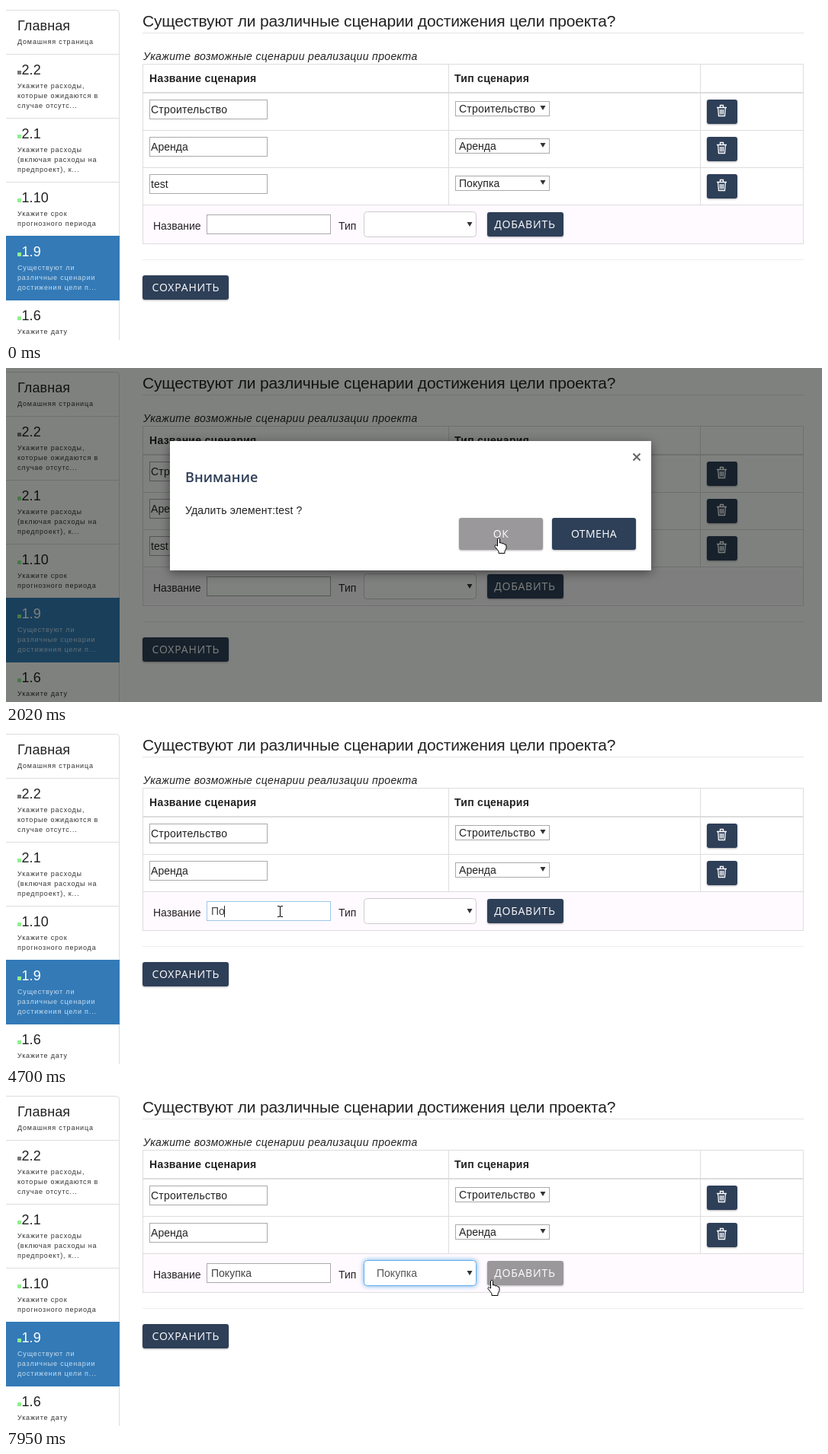
Recreate the animation shown at these times as an HTML page. Size 1070 by 439 pixels, loop 8 s.

```html
<!DOCTYPE html>
<html lang="ru">
<head>
<meta charset="utf-8">
<style>
html, body { margin: 0; width: 100%; height: 100%; overflow: hidden; background: #fff }
svg { display: block; width: 1070px; height: 439px; font: 14px Arial, "Liberation Sans", sans-serif }
text { white-space: pre }
.caps { font: 14px "Open Sans", "Noto Sans", sans-serif; text-anchor: middle }
.modal-title { font: 600 18px "Open Sans", "Noto Sans", sans-serif }
.button { filter: drop-shadow(0 1px 1px rgba(0, 0, 0, .3)) }
.modal { filter: drop-shadow(0 3px 7px rgba(0, 0, 0, .45)) }
.glow { filter: drop-shadow(0 0 3px #66afe9) }
</style>
</head>
<body>
<svg id="stage" viewBox="0 0 1070 439"></svg>
<script>
const stage = document.getElementById('stage');
const LOOP = 8000, NAVY = '#2e3f58', HOVER = '#9a989a', LINE = '#ddd', INK = '#222';

const rect = (x, y, w, h, fill, extra = '') =>
  `<rect x="${x}" y="${y}" width="${w}" height="${h}" fill="${fill}" ${extra}/>`;
const box = (x, y, w, h, stroke, extra = '') =>
  rect(x + .5, y + .5, w - 1, h - 1, '#fff', `stroke="${stroke}" ${extra}`);
const path = (d, extra = '') => `<path d="${d}" ${extra}/>`;
const lines = (d, color = LINE) => path(d, `fill="none" stroke="${color}"`);
const text = (x, y, s, { size = 14, fill = INK, gap = .1, extra = '' } = {}) =>
  `<text x="${x}" y="${y}" font-size="${size}" fill="${fill}" letter-spacing="${gap}" ${extra}>${s}</text>`;
const caps = (x, y, s, gap = .8) => text(x, y, s, { fill: '#fff', gap, extra: 'class="caps"' });
const arrowDown = (x, y) => path(`M${x} ${y}h7l-3.5 6z`, 'fill="#333"');
const button = (x, y, w, h, fill = NAVY) => rect(x, y, w, h, fill, 'rx="3" class="button"');

function sidebar() {
  const items = [
    [63, '2.2', '#777', 'Укажите расходы,', 'которые ожидаются в', 'случае отсутс...'],
    [147, '2.1', '#90ee90', 'Укажите расходы', '(включая расходы на', 'предпроект), к...'],
    [231, '1.10', '#90ee90', 'Укажите срок', 'прогнозного периода'],
    [302, '1.9', '#90ee90', 'Существуют ли', 'различные сценарии', 'достижения цели п...'],
    [386, '1.6', '#90ee90', 'Укажите дату']
  ];
  const small = (y, s, fill = '#333') => text(15, y, s, { size: 9, fill, gap: .83 });
  let out = lines('M0 5.5H144.5q4 0 4 4V439M0 63.5H148M0 147.5H148M0 231.5H148') +
    text(15, 32, 'Главная', { size: 18 }) + small(50, 'Домашняя страница');
  for (const [y, title, mark, ...rows] of items) {
    const active = title === '1.9';
    if (active) out += rect(0, y, 149, 85, '#337ab7');
    out += rect(15, y + 22, 5, 5, mark) +
      text(20.5, y + 27, title, { size: 18, fill: active ? '#fff' : INK });
    rows.forEach((s, i) => out += small(y + 45 + 13 * i, s, active ? '#c7ddef' : '#333'));
  }
  return out;
}

function row(i, name, kind, state) {
  const y = 123 + 49 * i;
  const gap = name.length > 10 ? .22 : .05;
  return lines(`M179 ${y + 40.5}H1046`) +
    box(188, y, 155, 26, '#aaa') + text(190, y + 18, name, { gap }) +
    box(589, y + 2, 124, 20, '#aaa') + text(594, y + 17, kind, { gap }) + arrowDown(700.5, y + 8) +
    button(919, y, 40, 32, state ? HOVER : NAVY) +
    (state === 'focus' ? rect(919, y, 40, 32, 'none', 'rx="3" stroke="#5f93dc" stroke-width="2"') : '') +
    path(`M932 ${y + 10.5}h13M936.5 ${y + 10}v-2.5h4v2.5M933.7 ${y + 11}l.8 10.5h8l.8-10.5M936.5 ${y + 13}v6.5M938.5 ${y + 13}v6.5M940.5 ${y + 13}v6.5`,
      'fill="none" stroke="#fff" stroke-width="1.3"');
}

function addForm(s) {
  const y = s.rows === 3 ? 262 : 213;
  const selectBorder = ['#ccc', '#a9cbe8', '#66afe9'][s.select];
  return rect(180, y, 865, 50, '#fffaff') + lines(`M179 ${y + 50.5}H1046`) +
    text(193, y + 32, 'Название', { gap: 0 }) +
    box(263, y + 12, 163, 26, s.input ? '#9cc9e8' : '#aaa') +
    text(269, y + 30, s.typed, { fill: '#444', gap: 0, extra: 'id="typed"' }) +
    (s.input && s.typed ? rect(0, y + 18, 1, 15, '#222', 'id="caret"') : '') +
    text(436, y + 32, 'Тип', { gap: 0 }) +
    box(469, y + 8, 148, 34, selectBorder, `rx="4" class="${s.select === 2 ? 'glow' : ''}"`) +
    text(486, y + 30, s.chosen, { fill: '#555', gap: 0 }) + arrowDown(604.5, y + 22) +
    button(631, y + 9, 100, 32, s.addHover ? HOVER : NAVY) + caps(680.5, y + 30, 'ДОБАВИТЬ') +
    lines(`M179 ${y + 71.5}H1046`, '#eee') +
    button(179, y + 92, 113, 32) + caps(236, y + 113, 'СОХРАНИТЬ');
}

function list(hot) {
  const names = ['Покупка', 'Аренда', 'Строительство', 'Другое'];
  return box(469, 255, 148, 74, '#7aa4da') + (hot ? rect(470, 256, 146, 18, '#1e90ff') : '') +
    names.map((n, i) => text(486, 269 + 17.8 * i, n,
      { fill: hot && !i ? '#fff' : '#555', gap: i === 2 ? .2 : .05 })).join('');
}

const modal = okHover =>
  rect(0, 0, 1070, 439, '#000400', 'opacity=".5"') +
  rect(215, 96, 631, 170, '#fff', 'class="modal"') +
  path('M822.5 112.5l9 9m0-9l-9 9', 'stroke="#666" stroke-width="2"') +
  text(235, 150, 'Внимание', { size: 18, fill: NAVY, gap: .1, extra: 'class="modal-title"' }) +
  text(235, 192, 'Удалить элемент:test ?', { gap: .17 }) +
  button(594, 197, 110, 42, okHover ? HOVER : NAVY) + caps(649, 223, 'ОК', .4) +
  button(716, 197, 110, 42) + caps(771, 223, 'ОТМЕНА', .4);

const cursors = {
  arrow: 'M0 0V17L4 13.3L6.7 19.5L9.5 18.3L6.8 12.2H12Z',
  hand: 'M-1.5 11V1.5Q0-1 1.5 1.5V7Q4 5.5 4.5 8Q7 6.5 7.5 9Q10 8 10 11V14L8 18V20.5H0V18L-5 11.5Q-5 8.5-2.5 10.5Z',
  beam: 'M-3 .5H-1Q.5 .5 .5 2Q.5 .5 2 .5H4M.5 2V13M-3 14.5H-1Q.5 14.5 .5 13Q.5 14.5 2 14.5H4'
};
const pointer = (kind, x, y) => path(cursors[kind],
  `transform="translate(${x} ${y})" stroke="#000" fill="${kind === 'beam' ? 'none' : '#fff'}"`);

const base = sidebar() +
  text(179, 27, 'Существуют ли различные сценарии достижения цели проекта?', { size: 21, gap: -.16 }) +
  lines('M179 35.5H1046', '#e5e5e5') +
  text(180, 71, 'Укажите возможные сценарии реализации проекта', { gap: .34, extra: 'font-style="italic"' }) +
  text(188, 100, 'Название сценария', { gap: .28, extra: 'font-weight="bold"' }) +
  text(588, 100, 'Тип сценария', { gap: .28, extra: 'font-weight="bold"' }) +
  rect(179, 113, 867, 2, LINE);

// Each step changes part of the state and holds until the next.
const steps = [
  [0, { rows: 3, typed: '', chosen: '', select: 0 }],
  [400, { cursor: ['arrow', 945, 361] }],
  [600, { cursor: ['arrow', 940, 235], trash: 'hover' }],
  [1220, { trash: 'focus' }],
  [1410, { trash: '', modal: 1 }],
  [1620, { cursor: ['arrow', 860, 232] }],
  [1820, { cursor: ['arrow', 720, 246] }],
  [2020, { cursor: ['hand', 646, 223], modal: 2 }],
  [2220, { cursor: ['hand', 648, 220], modal: 0 }],
  [2420, { rows: 2, cursor: ['arrow', 640, 225] }],
  [2640, { cursor: ['arrow', 545, 232] }],
  [2850, { cursor: ['arrow', 435, 236] }],
  [3070, { cursor: ['beam', 359, 231] }],
  [3290, { input: 1 }],
  [4700, { typed: 'По' }],
  [5100, { typed: 'Пок' }],
  [5310, { typed: 'Поку' }],
  [5710, { typed: 'Покуп' }],
  [5910, { typed: 'Покупк' }],
  [6110, { typed: 'Покупка' }],
  [6530, { cursor: ['arrow', 440, 239] }],
  [6730, { cursor: ['arrow', 496, 238] }],
  [6920, { input: 0, list: 1, select: 1 }],
  [7130, { cursor: ['arrow', 500, 248], select: 2 }],
  [7330, { cursor: ['arrow', 504, 260], list: 2 }],
  [7530, { cursor: ['arrow', 507, 264] }],
  [7730, { cursor: ['arrow', 560, 258], list: 0, chosen: 'Покупка' }],
  [7950, { cursor: ['hand', 637, 247], addHover: 1 }]
];

function draw(s) {
  const bottom = s.rows === 3 ? 313 : 264, cells = bottom - 51;
  stage.innerHTML = base + addForm(s) +
    row(0, 'Строительство', 'Строительство') + row(1, 'Аренда', 'Аренда') +
    (s.rows === 3 ? row(2, 'test', 'Покупка', s.trash) : '') +
    lines(`M179.5 ${bottom}V76.5H1045.5V${bottom}M580.5 76V${cells}M910.5 76V${cells}`) +
    (s.list ? list(s.list === 2) : '') + (s.modal ? modal(s.modal === 2) : '') +
    (s.cursor ? pointer(...s.cursor) : '');
  const caret = document.getElementById('caret');
  if (caret) caret.setAttribute('x', Math.floor(269 + document.getElementById('typed').getComputedTextLength()));
}

let shown = 0;
function tick() {
  const t = performance.now() % LOOP;
  const past = steps.filter(([at]) => at <= t);
  if (past.length !== shown) {
    shown = past.length;
    draw(Object.assign({}, ...past.map(([, change]) => change)));
  }
  requestAnimationFrame(tick);
}
tick();
</script>
</body>
</html>
```
